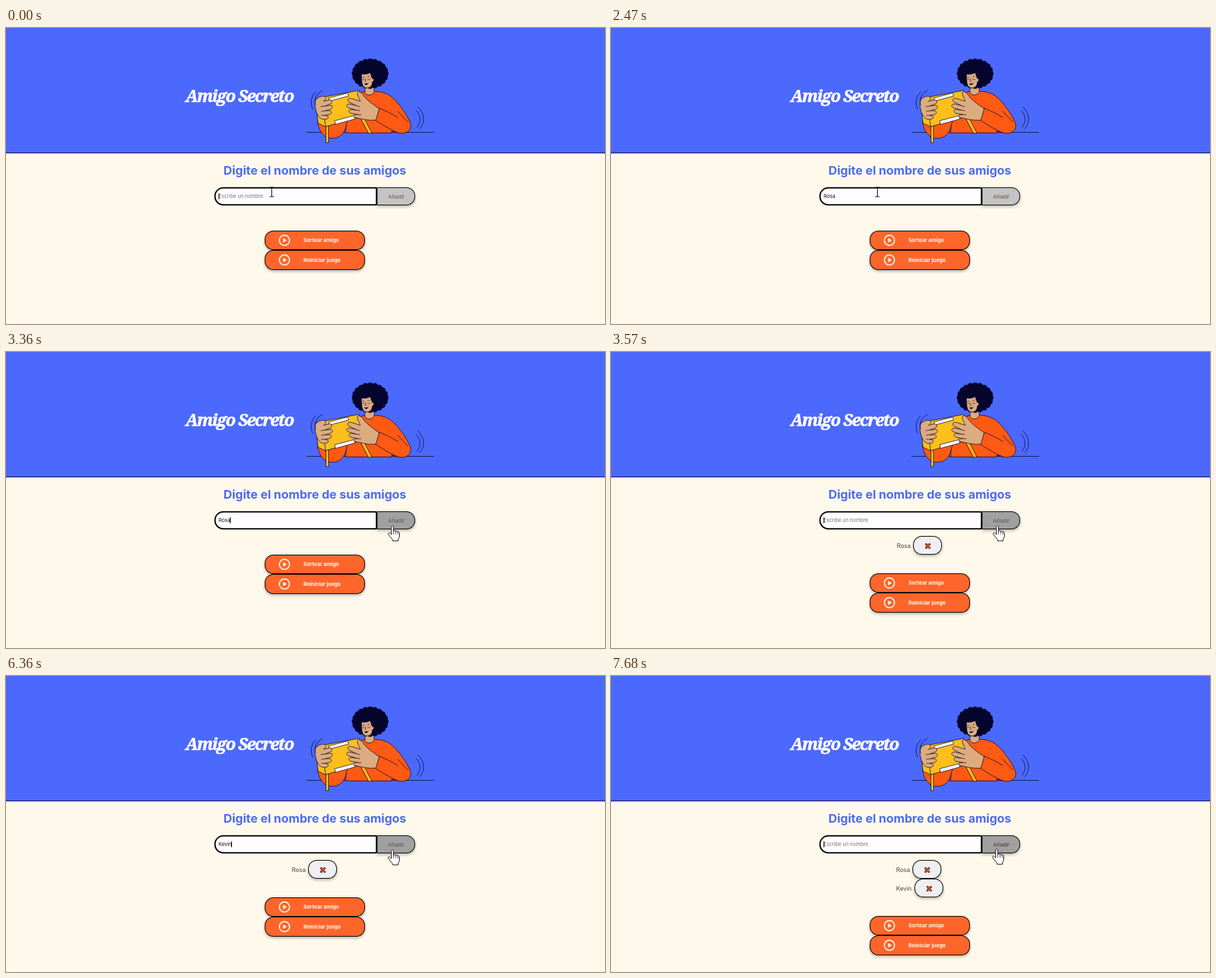
Recreate the animation shown at these times as an HTML page with a canvas. Size 896 px wide and 444 px high, loop 8000 ms.

```html
<!DOCTYPE html>
<html lang="es">
<head>
<meta charset="utf-8">
<title>Amigo Secreto</title>
<style>
html, body { margin: 0; width: 100%; height: 100%; overflow: hidden; background: #fff9eb; }
canvas { display: block; }
</style>
</head>
<body>
<canvas id="stage" width="896" height="444"></canvas>
<script>
const ctx = document.getElementById('stage').getContext('2d');
const LOOP = 8000;
const BLUE = '#4b69fd', CREAM = '#fff9eb', ORANGE = '#fe652b', NAVY = '#05052d';
const SKIN = '#dcab7f', SHIRT = '#ff5a14', YELLOW = '#fcbf1c';
const SANS = 'Inter, "Noto Sans", sans-serif';

// Each entry: the name, when its letters appear, when it joins the list.
const entries = [
  { name: 'Rosa', keys: [1010, 1470, 1670, 1870], added: 3570 },
  { name: 'Kevin', keys: [4560, 5280, 5740, 6070, 6360], added: 7680 }
];
const caretOff = [[410, 940], [2400, 2930], [4030, 4560], [5100, 5280], [6890, 7420]];

function text(str, x, y, size, color, weight = 400) {
  ctx.font = `${weight} ${size}px ${SANS}`;
  ctx.letterSpacing = '0px';
  ctx.fillStyle = color;
  ctx.fillText(str, x, y);
  return ctx.measureText(str).width;
}

function shape(d, fill, stroke = NAVY, width = 0.75) {
  const p = new Path2D(d);
  if (fill) { ctx.fillStyle = fill; ctx.fill(p); }
  if (stroke) { ctx.strokeStyle = stroke; ctx.lineWidth = width; ctx.stroke(p); }
}

function box(x, y, w, h, radii, fill, border, shadow) {
  ctx.save();
  if (shadow) {
    ctx.shadowColor = 'rgba(0,0,0,.3)';
    ctx.shadowBlur = 4;
    ctx.shadowOffsetY = 2;
  }
  ctx.beginPath();
  ctx.roundRect(x, y, w, h, radii);
  ctx.fillStyle = '#000';
  ctx.fill();
  ctx.restore();
  ctx.beginPath();
  ctx.roundRect(x + border, y + border, w - 2 * border, h - 2 * border,
    radii.map(r => Math.max(0, r - border)));
  ctx.fillStyle = fill;
  ctx.fill();
}

function person() {
  ctx.lineJoin = ctx.lineCap = 'round';
  shape('M450 156.5H640', null, NAVY, 0.8);

  // torso and right arm
  shape('M508 157C509 140 512 118 520 103C526 97 533 96 538 95H552C563 95 573 99 580 106C590 116 601 132 605 143C607 151 602 157 594 158C588 158 582 157 577 154V157Z', SHIRT);
  // left sleeve
  shape('M466 141C468 153 474 164 484 165C497 167 505 160 508 150L511 138L480 142Z', SHIRT);

  // neck, hair, face
  shape('M537 86V97C540 102 548 102 551 95L549 82Z', SKIN);
  ctx.fillStyle = NAVY;
  ctx.beginPath();
  ctx.ellipse(544.7, 68.5, 25, 20.5, 0, 0, 7);
  ctx.fill();
  for (let i = 0; i < 20; i++) {
    const a = i * Math.PI / 10;
    ctx.beginPath();
    ctx.arc(544.7 + 22.7 * Math.cos(a), 68.5 + 18 * Math.sin(a), 4.8, 0, 7);
    ctx.fill();
  }
  shape('M532 69C536 70 541 69 545 67C546 71 547 74 548 76C551 75 551 80 548 81C548 86 545 90 540 90C534 90 532 84 532 77Z', SKIN);
  shape('M533.5 74Q535 73 536 74M541 73Q543 72 544 73M533.5 77Q535 78 536 77M541 77Q543 78 544.5 77M538 76L537 80H539', null, NAVY, 0.6);
  shape('M536 82Q539 83 542 81.5Q541 86 538 85.5Q536 85 536 82Z', NAVY, null);
  shape('M536.7 82.5Q539 83.2 541 82.3', null, '#fff', 0.8);

  // present with tape and ribbons
  shape('M479 147H482.5V172H479Z', YELLOW);
  shape('M530 134L534 132L547 157L543 158.5Z', YELLOW);
  shape('M463 106L528 93.5L537 131L478 148L467 143Z', YELLOW);
  shape('M473 107L478 148', null);
  shape('M483 105L511 97.5L512.5 102L484.5 109.5Z', '#fff');
  shape('M492 139L520.5 131.5L522 136.5L493 144.5Z', '#fff');

  // left hand
  shape('M463 108C466 104 473 101 477 103C480 105 478 108 475 110L483 108C488 107 489 112 485 114L477 117L485 116C490 116 489 121 485 122L478 124L484 124C488 125 487 130 483 130L477 131L481 132C484 134 481 137 477 137C470 138 466 132 464 125C462 119 462 113 463 108Z', SKIN);
  shape('M477 117L471 118M478 124L472 125M477 131L472 131', null);

  // right forearm and hand
  shape('M558 120C567 124 583 131 590 137L586 157C575 153 560 143 552 138Z', SHIRT, null);
  shape('M586 157C575 153 560 143 552 138L558 120C567 124 578 129 586 134', null);
  shape('M586 125L601 141', null);
  shape('M558 121C551 116 542 110 536 103C533 98 529 94 526 96C524 100 529 106 530 110L518 106C512 104 509 108 513 111L523 116L514 114C508 114 509 119 513 120L523 123L516 122C511 123 513 128 517 128L526 130L521 130C518 132 522 135 526 135C537 138 547 139 553 138Z', SKIN);
  shape('M523 116L529 118M523 123L529 124M526 130L531 130', null);

  // shake lines
  shape('M463 96C455 104 455 115 459 122M473 94C463 99 461 108 463 115', null);
  shape('M616 118C627 129 627 142 619 151M614 124C621 132 621 140 615 149', null);
}

function header() {
  ctx.fillStyle = CREAM;
  ctx.fillRect(0, 0, 896, 444);
  ctx.fillStyle = BLUE;
  ctx.fillRect(0, 0, 896, 187);
  ctx.fillStyle = '#0a0a18';
  ctx.fillRect(0, 187, 896, 1);

  ctx.font = 'italic 900 25px "Noto Serif", serif';
  ctx.letterSpacing = '-1.6px';
  ctx.lineJoin = 'round';
  ctx.fillStyle = ctx.strokeStyle = '#fff';
  ctx.lineWidth = 0.6;
  ctx.fillText('Amigo Secreto', 268.5, 111);
  ctx.strokeText('Amigo Secreto', 268.5, 111);

  person();
  text('Digite el nombre de sus amigos', 325.2, 220, 18, BLUE, 700);
}

function action(label, y, h) {
  box(387, y, 150, h, [13, 13, 13, 13], ORANGE, 1, true);
  const cy = y + h / 2;
  ctx.strokeStyle = CREAM;
  ctx.lineWidth = 1.7;
  ctx.beginPath();
  ctx.arc(416.5, cy, 7.6, 0, 7);
  ctx.stroke();
  shape(`M414.5 ${cy - 3.6}L420 ${cy}L414.5 ${cy + 3.6}Z`, CREAM, null);
  text(label, 445, Math.floor(cy + 3), 7.7, CREAM, 700);
}

function form(t) {
  const hover = Math.min(1, Math.max(0, (t - 3130) / 150));
  const gray = Math.round(196 - 36 * hover);
  box(554.5, 239, 57.5, 27, [0, 13, 13, 0], `rgb(${gray},${gray},${gray})`, 1, true);
  const pressed = t >= 7600;
  text('Añadir', 571.5, 256, 8, pressed ? '#3c3430' : hover > 0.5 ? '#5a5552' : '#6b5240');

  // The field loses focus while the button is held down.
  const blurred = entries.some(e => t >= e.added - 130 && t < e.added);
  if (blurred) box(312, 239, 243, 27, [13, 0, 0, 13], '#fffdff', 1);
  else box(311.6, 238.7, 243.6, 27.5, [13.5, 3, 3, 13.5], '#fffdff', 2);

  const entry = entries.find(e => t < e.added);
  const typed = entry ? entry.name.slice(0, entry.keys.filter(k => t >= k).length) : '';
  let caret = 318;
  if (typed) caret += text(typed, 318, 255, 7.5, '#111');
  else text('Escribe un nombre', 318, 255, 7.5, '#7a7472');
  if (!blurred && !caretOff.some(([a, b]) => t >= a && t < b)) {
    ctx.fillStyle = '#000';
    ctx.fillRect(Math.floor(caret), 248, 1, 9);
  }
}

function list(t) {
  const items = entries.filter(e => t >= e.added);
  const left = items.length > 1 ? 426.5 : 427.5;
  items.forEach((item, i) => {
    const y = 276 + 28 * i;
    const w = text(item.name, left, y + 18, 9, '#444');
    const x = Math.floor(left + w + 4.4);
    box(x, y, 43, 28, [13, 13, 13, 13], '#efeff0', 1, true);
    const cross = `M${x + 19.4} ${y + 12.4}l5.2 5.2m0 -5.2l-5.2 5.2`;
    shape(cross, null, '#30100c', 3);
    shape(cross, null, '#f0552c', 1.6);
  });
  const drop = 28 * items.length;
  action('Sortear amigo', 304 + drop, 29);
  action('Reiniciar juego', 333 + drop, 30);
}

function beam(x, y) {
  shape(`M${x - 3} ${y - 7}h2.5l.5 .8l.5 -.8h2.5M${x} ${y - 7}v14M${x - 3} ${y + 7}h2.5l.5 -.8l.5 .8h2.5`, null, '#111', 1.1);
}

function hand(x, y) {
  ctx.save();
  ctx.translate(x, y);
  shape('M-1.8 1.3C-1.8 -.8 1.6 -.8 1.6 1.3V8C2 6.4 4.8 6.4 5 8.4C5.8 7 8 7.4 8.2 9.2C9.2 8.2 10.5 8.8 10.5 10.6V15C10.5 17 9.2 18.5 8.6 20V22.3H.4V20.5C-2 18 -4 15.5 -6 12.8C-7.3 10.7 -5.2 9.2 -3.6 10.7L-1.8 12.6Z', '#fff', '#111', 1);
  shape('M1.6 8V12M5 8.4V12M8.2 9.2V12.4', null, '#111', 0.8);
  ctx.restore();
}

function pointer(t) {
  if (t < 3150) {
    const k = Math.min(1, Math.max(0, (t - 2450) / 620));
    const e = k * k * (3 - 2 * k);
    beam(397.5 + Math.round(162 * e), 246 + Math.round(18 * e - 3 * Math.sin(Math.PI * e)));
  } else if (t < 3220) hand(574, 264);
  else if (t < 7220) hand(578, 261);
  else hand(577, 260);
}

function draw(now) {
  const t = now % LOOP;
  header();
  list(t);
  form(t);
  pointer(t);
  requestAnimationFrame(draw);
}
requestAnimationFrame(draw);
</script>
</body>
</html>
```
